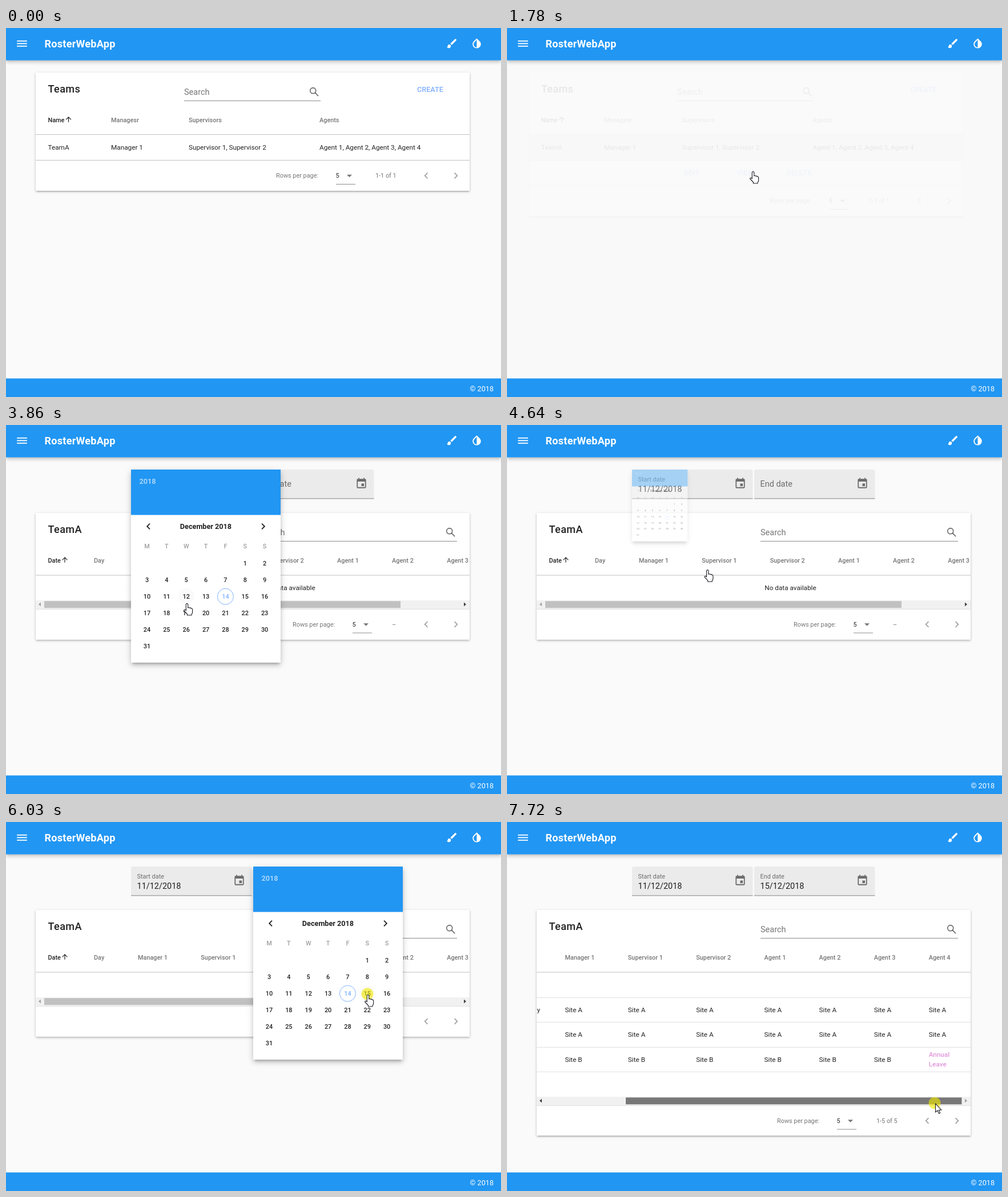
An HTML page with a canvas that plays this animation: 867x646 px, repeating every 8 s.

```html
<!DOCTYPE html>
<html lang="en">
<head>
<meta charset="utf-8">
<title>Roster</title>
<style>
html, body { margin: 0; width: 100%; height: 100%; overflow: hidden; background: #fafafa; }
canvas { display: block; width: 867px; height: 646px; }
</style>
</head>
<body>
<canvas id="stage" width="867" height="646"></canvas>
<script>
const ctx = document.getElementById('stage').getContext('2d');
const LOOP = 8000, START = 220, STEP = 77.2;
const BLUE = '#2196f3', ACCENT = '#82b1ff';
const DARK = 'rgba(0,0,0,.87)', MUTED = 'rgba(0,0,0,.54)', FAINT = 'rgba(0,0,0,.36)';
const UNDERLINE = 'rgba(0,0,0,.45)', STRONG = '#c2c2c2', LIGHT = '#e0e0e0';
const SMALL = 10.86, BODY = 11.77, BUTTON = 12.67, INPUT = 14.48, TITLE = 18.1;

const CLICK = { row: 800, view: 1515, start: 2700, startDay: 4460, end: 4921, endDay: 5940 };
const REACTION = 80, DRAG = 7385;

// Pointer moves, each starting where the one before ended
const ORIGIN = { x: 800, y: 655 };
const MOVES = [
  { from: 150, to: 610, x: 450, y: 216 },
  { from: 1000, to: 1320, x: 431, y: 251, hand: true },
  { from: 2010, to: 2640, x: 370, y: 111, hand: true },
  { from: 2850, to: 3650, x: 347, y: 309, hand: true },
  { from: 3650, to: 3830, x: 317, y: 312, hand: true },
  { from: 3850, to: 4180, x: 283, y: 303, hand: true },
  { from: 4480, to: 4900, x: 545, y: 112, hand: true },
  { from: 5000, to: 5235, x: 555, y: 211 },
  { from: 5260, to: 5640, x: 634, y: 302, hand: true },
  { from: 6550, to: 6705, x: 613, y: 411 },
  { from: 6720, to: 7160, x: 609, y: 488 },
  { from: DRAG, to: 7700, x: 750, y: 493 }
];

const clamp = v => Math.min(1, Math.max(0, v));
const smooth = p => p * p * (3 - 2 * p);

// cubic-bezier(.25, .8, .5, 1)
function ease(p) {
  p = clamp(p);
  let lo = 0, hi = 1, s = p;
  for (let i = 0; i < 20; i++) {
    const q = 1 - s;
    if (.75 * q * q * s + 1.5 * q * s * s + s * s * s < p) lo = s; else hi = s;
    s = (lo + hi) / 2;
  }
  const q = 1 - s;
  return 1 - q * q * q - .6 * q * q * s;
}
const progress = (t, from) => ease((t - from) / 300);

function pointerAt(t) {
  let { x, y } = ORIGIN, hand = false;
  for (const move of MOVES) {
    const p = smooth(clamp((t - move.from) / (move.to - move.from)));
    x += (move.x - x) * p;
    y += (move.y - y) * p;
    if (p > .5) hand = !!move.hand;
  }
  return { x, y, hand: hand && t < CLICK.endDay + REACTION };
}

function rect(x, y, w, h, color) {
  ctx.fillStyle = color;
  ctx.fillRect(x, y, w, h);
}

// y is the middle of the capital letters
function text(str, x, y, size, color = DARK, weight = 400, align = 'left', spacing = 0) {
  ctx.font = `${weight} ${size}px Roboto, sans-serif`;
  ctx.letterSpacing = spacing + 'px';
  ctx.textAlign = align;
  ctx.fillStyle = color;
  ctx.fillText(str, x, y + size * .356);
}

// Three soft shadows outside the box: a sharp one, a middle one and a wide one
function panel(x, y, w, h, color, lift) {
  ctx.save();
  ctx.beginPath();
  ctx.rect(x - 50, y - 50, w + 100, h + 100);
  ctx.rect(x, y, w, h);
  ctx.clip('evenodd');
  const shadow = (dy, blur, inset, alpha) => {
    ctx.shadowColor = `rgba(0,0,0,${alpha})`;
    ctx.shadowOffsetY = dy;
    ctx.shadowBlur = blur;
    rect(x + inset, y, w - 2 * inset, h - inset, color);
  };
  shadow(1 + lift, 1 + lift, 1 + lift / 2, .2);
  shadow(1.8 * lift, 1.8 + 2 * lift, 0, .14);
  shadow(.9 * lift, 4.5 * lift, 0, .12);
  ctx.restore();
  rect(x, y, w, h, color);
}

function stroke(points, color, width) {
  ctx.beginPath();
  points.forEach(([x, y]) => ctx.lineTo(x, y));
  ctx.strokeStyle = color;
  ctx.lineWidth = width;
  ctx.stroke();
}

function disc(x, y, r, color) {
  ctx.beginPath();
  ctx.arc(x, y, r, 0, Math.PI * 2);
  ctx.fillStyle = color;
  ctx.fill();
}

function ring(x, y, r, color, width) {
  ctx.beginPath();
  ctx.arc(x, y, r, 0, Math.PI * 2);
  ctx.strokeStyle = color;
  ctx.lineWidth = width;
  ctx.stroke();
}

// Icons live on a 24 unit grid centred on (x, y)
function icon(draw, x, y, color, size = 21.7) {
  ctx.save();
  ctx.translate(x - size / 2, y - size / 2);
  ctx.scale(size / 24, size / 24);
  ctx.fillStyle = color;
  draw(color);
  ctx.restore();
}
const brushPath = new Path2D('M20.7 4.6l-1.3-1.3q-.7-.6-1.4 0L9 12.3 11.8 15l8.9-9q.6-.7 0-1.4zM7 14a3 3 0 0 0-3 3q0 2-2 2 1.5 2 4 2a4 4 0 0 0 4-4 3 3 0 0 0-3-3z');
const dropPath = new Path2D('M12 2.3L6.3 7.9A8 8 0 1 0 17.7 7.9zM12 5.1L7.8 9.4A6 6 0 0 0 12 19.6z');
const brush = () => ctx.fill(brushPath);
const drop = () => ctx.fill(dropPath, 'evenodd');
const menu = () => [6, 11, 16].forEach(y => ctx.fillRect(2.2, y, 19.6, 2));
const caret = () => { ctx.beginPath(); ctx.moveTo(7, 10); ctx.lineTo(17, 10); ctx.lineTo(12, 15); ctx.fill(); };
const chevLeft = c => stroke([[14.7, 6.7], [9.4, 12], [14.7, 17.3]], c, 2);
const chevRight = c => stroke([[9.3, 6.7], [14.6, 12], [9.3, 17.3]], c, 2);
const arrowUp = c => { stroke([[12, 20], [12, 5]], c, 2); stroke([[4.7, 12.7], [12, 5.4], [19.3, 12.7]], c, 2); };
const magnifier = c => { ring(9.5, 9.5, 5.5, c, 2); stroke([[13.6, 13.6], [19.8, 19.8]], c, 2.1); };
function calendar() {
  ctx.beginPath();
  ctx.roundRect(3, 3, 18, 18, 2);
  ctx.rect(5, 8, 14, 11);
  ctx.fill('evenodd');
  ctx.fillRect(6, 1, 2, 2);
  ctx.fillRect(16, 1, 2, 2);
  ctx.fillRect(12, 12, 5, 5);
}

function searchBox(x0, x1, y) {
  text('Search', x0, y, INPUT, MUTED);
  icon(magnifier, x1 - 11, y, MUTED);
  rect(x0, y + 15, x1 - x0, 1, UNDERLINE);
}

function tableFooter(x, y, range) {
  text('Rows per page:', x, y, SMALL, MUTED);
  text('5', x + 104.5, y, SMALL);
  icon(caret, x + 128.5, y, MUTED);
  rect(x + 105, y + 14.5, 34, 1, UNDERLINE);
  text(range, x + 174, y, SMALL, MUTED);
  icon(chevLeft, 736, y, FAINT);
  icon(chevRight, 788, y, FAINT);
}

function scrollbar(y, shift, width, color) {
  rect(52, y, 760, 15, '#f1f1f1');
  rect(67 + shift, y + 1.3, width, 12, color);
  const arrow = (x, dir, active) => {
    ctx.beginPath();
    ctx.moveTo(x + 2 * dir, y + 7);
    ctx.lineTo(x - 2 * dir, y + 3.5);
    ctx.lineTo(x - 2 * dir, y + 10.5);
    ctx.fillStyle = active ? '#404040' : '#a3a3a3';
    ctx.fill();
  };
  arrow(59, -1, shift > 0);
  arrow(804, 1, shift < 140);
}

function clipBox(x, y, w, h) {
  ctx.save();
  ctx.beginPath();
  ctx.rect(x, y, w, h);
  ctx.clip();
}

function teamsPage(t) {
  const open = 44 * progress(t, CLICK.row + REACTION);
  panel(52, 78, 760, 207 + open, '#fff', 1);
  text('Teams', 73.5, 107, TITLE, DARK, 500, 'left', .36);
  searchBox(312, 551, 112);
  text('CREATE', 720, 107, BUTTON, ACCENT, 500);
  const columns = [
    ['Name', 'TeamA', 73.5], ['Managesr', 'Manager 1', 184],
    ['Supervisors', 'Supervisor 1, Supervisor 2', 320], ['Agents', 'Agent 1, Agent 2, Agent 3, Agent 4', 549]
  ];
  rect(52, 187, 759, 44, `rgba(0,0,0,${.067 * clamp((t - CLICK.row) / 100)})`);
  columns.forEach(([head, cell, x], i) => {
    text(head, x, 161, SMALL, i ? MUTED : DARK, 500);
    text(cell, x, 209, BODY);
  });
  icon(arrowUp, 109.5, 160, DARK, 14.5);
  rect(52, 186, 760, 1, STRONG);
  clipBox(52, 232, 760, open);
  text('EDIT', 324, 253.5, BUTTON, ACCENT, 500);
  text('VIEW', 416, 253.5, BUTTON, ACCENT, 500);
  text('DELETE', 503, 253.5, BUTTON, ACCENT, 500);
  ctx.restore();
  rect(52, 231 + open, 760, 1, LIGHT);
  rect(52, 231, 760, 1, STRONG);
  tableFooter(473, 258.5 + open, '1-1 of 1');
}

function dateField(x, label, value, hover) {
  ctx.beginPath();
  ctx.roundRect(x, 78, 211.5, 51.2, [3.6, 3.6, 0, 0]);
  ctx.fillStyle = hover ? '#dcdcdc' : '#ebebeb';
  ctx.fill();
  rect(x, 128.4, 211.5, 1, hover ? DARK : UNDERLINE);
  text(label, x + 10.5, value ? 95 : 103, value ? SMALL : INPUT, MUTED);
  if (value) text(value, x + 10.5, 112, INPUT);
  icon(calendar, x + 189.5, 102.5, MUTED);
}

const PEOPLE = ['Manager 1', 'Supervisor 1', 'Supervisor 2', 'Agent 1', 'Agent 2', 'Agent 3', 'Agent 4'];
const DAYS = ['Tuesday', 'Wednesday', 'Thursday', 'Friday', 'Saturday'];
const ROW = 43.6;

// Highlight trails the pointer and fades as it passes
function rowHover(row, t) {
  const samples = 9;
  let hits = 0;
  for (let i = 0; i < samples; i++) {
    const y = pointerAt(t - 60 - 10 * i).y;
    if (Math.floor((y - 263) / ROW) === row) hits++;
  }
  return hits / samples;
}

function rosterTable(filled, drag, t) {
  clipBox(52, 200, 760, 300);
  ctx.translate(-182.5 * drag, 0);
  text('Date', 73.5, 237, SMALL, DARK, 500);
  icon(arrowUp, 103, 236, DARK, 14.5);
  const dayX = filled ? 180 : 154;
  text('Day', dayX, 237, SMALL, MUTED, 500);
  let next = filled ? 284 : 231;
  const columns = PEOPLE.map(name => {
    const x = next;
    text(name, x, 237, SMALL, MUTED, 500);
    next += ctx.measureText(name).width + 58.3;
    return x;
  });
  if (filled) DAYS.forEach((day, row) => {
    const y = 285 + ROW * row;
    rect(52, y - 21, 1000, 43, `rgba(0,0,0,${.067 * rowHover(row, t)})`);
    if (row) rect(52, Math.round(y - 22), 1000, 1, LIGHT);
    text(`${11 + row}/12/2018`, 73.5, y, BODY);
    text(day, dayX, y, BODY);
    if (row % 4 === 0) return;
    columns.forEach((x, i) => {
      if (row === 3 && i === 6) {
        text('Annual', x, y - 8.5, BODY, '#e095da', 500);
        text('Leave', x, y + 8.5, BODY, '#e095da', 500);
      } else text(row === 3 ? 'Site B' : 'Site A', x, y, BODY);
    });
  });
  ctx.restore();
  rect(52, 262.5, 760, 1, STRONG);
}

function rosterPage(t, pointer) {
  const started = t >= CLICK.startDay + REACTION, filled = t >= CLICK.endDay + REACTION;
  const over = x => pointer.y < 129 && pointer.x > x && pointer.x < x + 211;
  const drag = t > DRAG ? clamp((pointer.x - 609) / 141) : 0;
  dateField(219, 'Start date', started && '11/12/2018', over(219));
  dateField(433, 'End date', filled && '15/12/2018', over(433));
  panel(52, 154, 760, filled ? 395 : 221.7, '#fff', 1);
  text('TeamA', 73.5, 183, TITLE, DARK, 500, 'left', .36);
  searchBox(444, 790, 188);
  rosterTable(filled, drag, t);
  if (filled) {
    const color = t > DRAG ? '#787878' : pointer.y > 481 ? '#a8a8a8' : '#c1c1c1';
    scrollbar(481, 141 * drag, 588.5, color);
    rect(52, 496, 760, 1, LIGHT);
    tableFooter(473, 523, '1-5 of 5');
  } else {
    text('No data available', 496.5, 285, BODY, DARK, 400, 'center');
    scrollbar(307, 0, 624, '#c1c1c1');
    rect(52, 322, 760, 1, LIGHT);
    tableFooter(502, 349, '–');
  }
}

function datePicker(left, t, openClick, dayClick, pointer) {
  const p = progress(t, openClick + REACTION) * (1 - progress(t, dayClick + REACTION));
  if (p <= .001) return;
  ctx.save();
  ctx.globalAlpha = p;
  ctx.translate(left, 78);
  ctx.scale(p, p);
  panel(0, 0, 262, 338, '#fff', 3);
  rect(0, 0, 262, 79.5, BLUE);
  text('2018', 14.5, 20, BUTTON, 'rgba(255,255,255,.6)', 700);
  text('December 2018', 131, 99.5, BUTTON, DARK, 700, 'center');
  icon(chevLeft, 30.5, 99.5, DARK);
  icon(chevRight, 231.5, 99.5, DARK);
  const colX = i => 28 + 34.35 * i;
  [...'MTWTFSS'].forEach((d, i) => text(d, colX(i), 134.5, SMALL, 'rgba(0,0,0,.38)', 500, 'center'));
  for (let day = 1; day <= 31; day++) {
    const cell = day + 4, x = colX(cell % 7), y = 164 + 29 * Math.floor(cell / 7), today = day === 14;
    if (Math.hypot(pointer.x - left - x, pointer.y - 78 - y) < 14.5) disc(x, y, 14, 'rgba(0,0,0,.02)');
    if (today) ring(x, y + .3, 14, ACCENT, 1);
    text(String(day), x, y, SMALL, today ? ACCENT : DARK, 500, 'center');
  }
  ctx.restore();
}

const arrowCursor = new Path2D('M.5 0V15.2L4 12 6.4 17.4 8.6 16.4 6.3 11.2H10.8Z');
const handCursor = new Path2D('M-1.7 1.8q1.7-2.8 3.4 0V8q1.8-1.2 3.2.4 1.8-.8 2.6.8 1.8-.4 2.1 1.6V15.5q0 2-1.6 4V21H.4V19L-5.3 13q.2-2.4 2.2-1.6L-1.7 12.8Z');

function drawPointer(t, { x, y, hand }) {
  if (t < START) return;
  const pressed = t > DRAG || Object.values(CLICK).some(at => Math.abs(t - at - 35) < 65);
  if (pressed) disc(x - 1, y - 1, 10.5, 'rgba(240,232,0,.62)');
  const shape = hand ? handCursor : arrowCursor;
  ctx.save();
  ctx.translate(x, y);
  ctx.fillStyle = '#fff';
  ctx.fill(shape);
  ctx.strokeStyle = '#1a1a22';
  ctx.lineWidth = 1.1;
  ctx.lineJoin = 'round';
  ctx.stroke(shape);
  ctx.restore();
}

// Pages slide sideways while they fade into the background
function slidePage(shown, draw) {
  if (shown <= .001) return;
  ctx.save();
  ctx.translate(-15 * (1 - shown), 0);
  draw();
  ctx.restore();
  rect(0, 0, 867, 646, `rgba(250,250,250,${1 - shown})`);
}

function render(t) {
  const pointer = pointerAt(t), leaving = CLICK.view + REACTION;
  rect(0, 0, 867, 646, '#fafafa');
  slidePage(1 - progress(t, leaving), () => teamsPage(t));
  slidePage(progress(t, leaving + 340), () => rosterPage(t, pointer));
  datePicker(219, t, CLICK.start, CLICK.startDay, pointer);
  datePicker(433, t, CLICK.end, CLICK.endDay, pointer);

  panel(0, 0, 867, 56.4, BLUE, 2);
  icon(menu, 28, 27.3, '#fff');
  text('RosterWebApp', 67.5, 27.5, TITLE, '#fff', 700, 'left', .24);
  icon(brush, 781, 27, '#fff');
  icon(drop, 824.5, 27, '#fff');
  rect(0, 613.5, 867, 33, BLUE);
  text('© 2018', 854, 631, BUTTON, '#fff', 400, 'right');
  drawPointer(t, pointer);
}

// The screen updates at a fixed cadence, about thirteen times a second
function cadence(t) {
  return t < START ? 0 : START + Math.floor((t - START + 8) / STEP) * STEP;
}

function tick(now) {
  render(cadence(now % LOOP));
  requestAnimationFrame(tick);
}
tick(performance.now());
</script>
</body>
</html>
```
